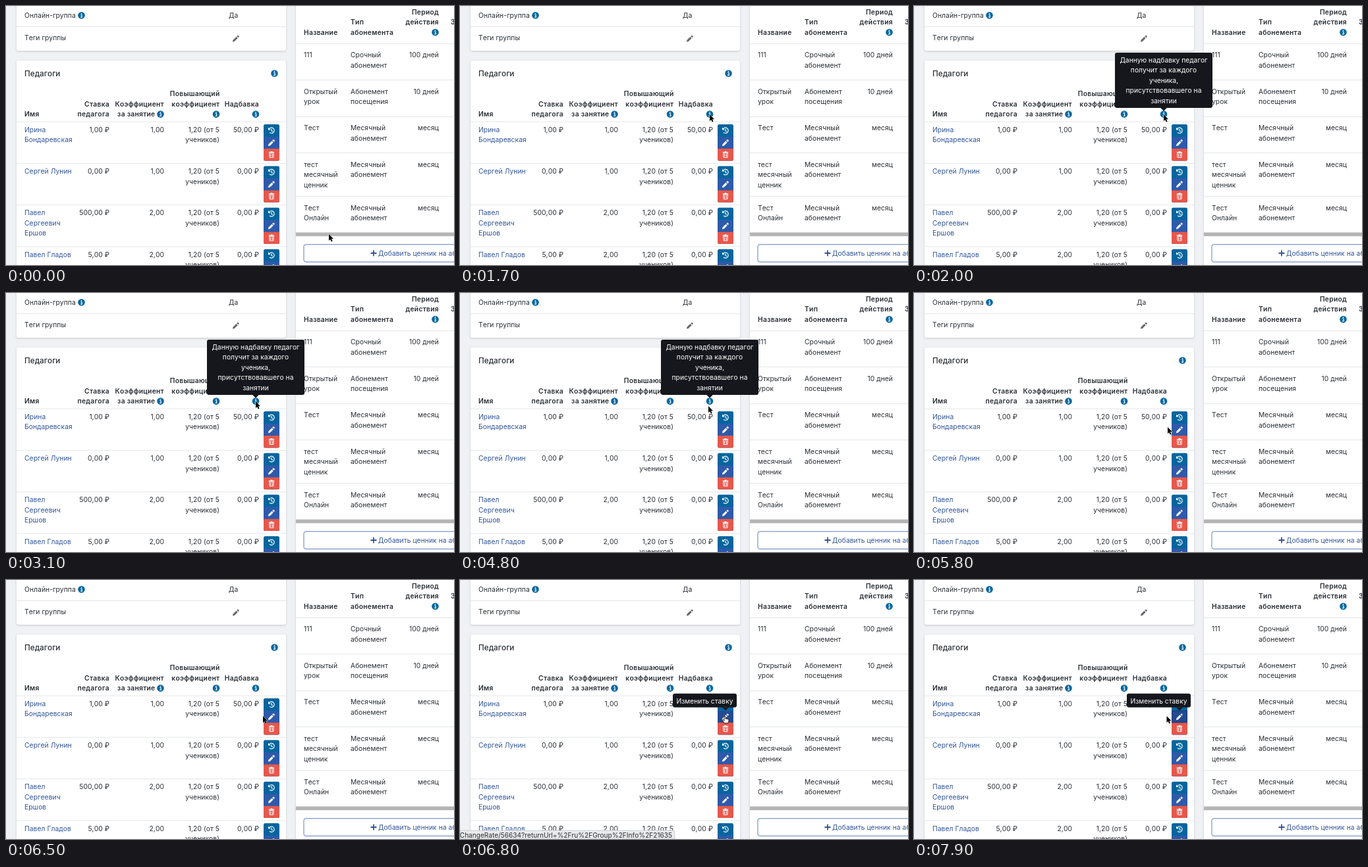
Recreate the animation shown at these times as an HTML page. Size 680 px wide and 394 px high, loop 8 s.

```html
<!DOCTYPE html>
<html lang="ru">
<head>
<meta charset="utf-8">
<style>
  html, body { margin: 0; width: 100%; height: 100%; overflow: hidden; background: #f0f1f4; }
  svg { display: block; width: 680px; height: 394px; }
  text { font: 10.3px Inter, sans-serif; font-kerning: none; letter-spacing: .06px; fill: #292d33; }
  .head { font-weight: 600; letter-spacing: .28px; }
  .title { font-size: 11.7px; font-weight: 500; }
  .link { fill: #315599; }
  .tip text { fill: #fff; letter-spacing: 0; }
  .tip { fill: #15171d; }
  .card { fill: #fff; filter: drop-shadow(0 1px 1.5px rgba(30, 35, 50, .2)); }
  .rule { stroke: #e4e6ea; }
  #status text { font-size: 10.1px; letter-spacing: 0; }
</style>
</head>
<body>
<svg id="stage" viewBox="0 0 680 394">
  <defs>
    <g id="info">
      <circle r="5.3" fill="#0667a0"/>
      <path d="M-1.3-.8H.6V2.5M-1.5 2.6H1.6" fill="none" stroke="#fff" stroke-width="1.1"/>
      <circle cy="-2.8" r=".85" fill="#fff"/>
    </g>
    <path id="pencil" d="M-5 5l.5-2.7 5-5 2.2 2.2-5 5zM1.2-3.4l1.2-1.2q.6-.6 1.2 0l1 1q.6.6 0 1.2L3.4-1.2z"/>
    <g id="history" fill="none" stroke="#fff" stroke-width="1.2">
      <path d="M-3.5-2.4A4.2 4.2 0 1 1-2.9 3.1M0-2.4V.3L1.8 1.6"/>
      <path d="M-5-4.6V-.9H-1.3z" fill="#fff" stroke="none"/>
    </g>
    <g id="trash" fill="none" stroke="#fff">
      <path d="M-4.3-3.6H4.3M-1.5-4.6H1.5" stroke-width="1.2"/>
      <path d="M-3.3-2.2H3.3L2.9 4.4H-2.9zM-1.3-1V3.2M1.3-1V3.2"/>
    </g>
  </defs>
  <g id="page"></g>
  <g id="hover">
    <rect id="hot" x="391.5" y="199.2" width="23" height="17.6" fill="#244a8f"/>
    <use href="#pencil" x="403" y="208" fill="#fff"/>
  </g>
  <g id="bonusTip" class="tip"></g>
  <g id="rateTip" class="tip"></g>
  <g id="status">
    <path d="M0 381H323.5q2.5 0 2.5 2.5V394H0z" fill="#e9eaec" stroke="#c3c6cb" stroke-width=".8"/>
    <text x="322" y="391.7" text-anchor="end">ChangeRate/56634?returnUrl=%2Fru%2FGroup%2FInfo%2F21635</text>
  </g>
  <path id="arrow" d="M0 0V9.9L2.2 7.9 3.8 11.4 5.6 10.7 4 7.2H7.1z" fill="#000" stroke="#fff" stroke-width=".9" paint-order="stroke"/>
  <path id="hand" d="M-1 .8Q0-.6 1 .8V4.2Q2.2 3.2 3 4.4 4.1 3.7 4.7 4.9 6 4.6 6 6V8L4.8 10.8H-.7L-3.5 6.8Q-3.7 5.3-2.2 5.8L-1 6.9z" fill="#fff" stroke="#111" stroke-width=".9"/>
</svg>
<script>
const $ = id => document.getElementById(id);
const LINE = 15.5;

const rect = (x, y, w, h, attrs = '') => `<rect x="${x}" y="${y}" width="${w}" height="${h}" ${attrs}/>`;
const rule = (x1, x2, y) => `<path class="rule" d="M${x1} ${y}H${x2}"/>`;
const icon = (name, x, y, fill = '#fff') => `<use href="#${name}" x="${x}" y="${y}" fill="${fill}"/>`;
// Lines are separated by "|"
const text = (str, x, y, cls = '', anchor = 'start') => str.split('|').map((s, i) =>
  `<text x="${x}" y="${y + i * LINE}" class="${cls}" text-anchor="${anchor}">${s}</text>`).join('');
const right = (str, x, y, cls) => text(str, x, y, cls, 'end');

function leftCards() {
  let out = rect(16, -10, 409, 78, 'rx="3" class="card"') + rect(16, 83, 409, 330, 'rx="3" class="card"')
    + text('Онлайн-группа', 28, 18) + text('Да', 338, 18) + rule(16, 425, 31.5)
    + text('Теги группы', 28, 52.3) + icon('pencil', 349, 49.5, '#666a70')
    + text('Педагоги', 28, 106.5, 'title')
    + text('Имя', 28, 168.2, 'head')
    + right('Ставка|педагога', 157, 152.7, 'head')
    + right('Коэффициент', 240, 152.7, 'head') + right('за занятие', 226.5, 168.2, 'head')
    + right('Повышающий|коэффициент', 324.5, 137.2, 'head')
    + right('Надбавка', 384, 152.7, 'head');
  for (const [x, y] of [[114.5, 14.3], [407.5, 102.5], [234.5, 164.6], [319, 164.6], [379, 164.6]])
    out += icon('info', x, y);

  const teachers = [
    ['Ирина|Бондаревская', '1,00', '1,00', '50,00'],
    ['Сергей Лунин', '0,00', '1,00', '0,00'],
    ['Павел|Сергеевич|Ершов', '500,00', '2,00', '0,00'],
    ['Павел Гладов', '5,00', '2,00', '0,00'],
  ];
  teachers.forEach(([name, rate, factor, bonus], i) => {
    const y = 191.8 + i * 63.3, top = y - 11.7;
    out += rule(16, 425, y - 15.7)
      + text(name, 28, y, 'link') + right(rate + ' ₽', 157, y) + right(factor, 240, y)
      + right('1,20 (от 5|учеников)', 324, y) + right(bonus + ' ₽', 384, y)
      + rect(391, top, 24, 55.3, 'rx="2.5" fill="#04659e"')
      + rect(391, top + 18.7, 24, 18.5, 'fill="#2e5aaa"')
      + `<path d="M391 ${top + 37}h24v15.8q0 2.5-2.5 2.5h-19q-2.5 0-2.5-2.5z" fill="#e7574c"/>`
      + icon('history', 403, top + 9.2) + icon('pencil', 403, top + 27.8) + icon('trash', 403, top + 46);
  });
  return out;
}

function rightCard() {
  let out = rect(440, -10, 260, 420, 'class="card"')
    + text('Название', 452, 43.5, 'head') + text('Тип|абонемента', 523, 28, 'head')
    + right('Период|действия', 657, 12.5, 'head') + text('З', 675, 28, 'head')
    + icon('info', 651.5, 40);
  const plans = [
    [78, '111', 'Срочный|абонемент', '100 дней'],
    [133.6, 'Открытый|урок', 'Абонемент|посещения', '10 дней'],
    [189, 'Тест', 'Месячный|абонемент', 'месяц'],
    [244.7, 'тест|месячный|ценник', 'Месячный|абонемент', 'месяц'],
    [310.5, 'Тест|Онлайн', 'Месячный|абонемент', 'месяц'],
  ];
  for (const [y, name, type, period] of plans)
    out += rule(440, 680, Math.round(y - 21.5) + .5) + text(name, 452, y) + text(type, 523, y) + right(period, 657, y);
  return out + rect(440, 344.5, 240, 5.7, 'fill="#b5b5b6"')
    + rect(452, 362.8, 260, 26.6, 'rx="3" fill="#fff" stroke="#4c70b3" stroke-width=".9"')
    + '<path d="M553.5 376H562.5M558 371.5V380.5" stroke="#315599" stroke-width="1.8"/>'
    + text('Добавить ценник на абонемент', 565, 379.8, 'link');
}

const tip = (x, y, w, h, ax, str) => rect(x, y, w, h, 'rx="3"')
  + `<path d="M${ax - 5} ${y + h - .3}h10l-5 5z"/>` + text(str, x + w / 2, y + 14.8, '', 'middle');

$('page').innerHTML = leftCards() + rightCard();
$('bonusTip').innerHTML = tip(305, 71, 148, 84, 379,
  'Данную надбавку педагог|получит за каждого|ученика,|присутствовавшего на|занятии');
$('rateTip').innerHTML = tip(323, 172.8, 97, 21, 403, 'Изменить ставку');

// [time, x, y] of the pointer tip
const path = [
  [0, 490, 347], [200, 481, 325], [500, 437, 235], [800, 409, 180], [900, 405, 172],
  [1200, 380, 165], [1400, 378, 163], [1500, 378, 163], [1700, 379, 165], [4700, 379, 165],
  [4800, 377, 172], [5600, 377, 185], [5800, 385, 204], [6500, 390, 207], [6600, 402, 207],
  [7400, 402, 207], [7600, 392, 207], [7900, 383.5, 207],
];

function pointer(t) {
  const i = path.findIndex(p => p[0] > t);
  if (i < 0) return path[path.length - 1].slice(1);
  const [t0, x0, y0] = path[i - 1], [t1, x1, y1] = path[i], k = (t - t0) / (t1 - t0);
  return [x0 + (x1 - x0) * k, y0 + (y1 - y0) * k];
}

const ramp = (t, a, b) => Math.min(1, Math.max(0, (t - a) / (b - a)));
const fade = (id, t, a, b, c, d) => $(id).setAttribute('opacity', ramp(t, a, b) - ramp(t, c, d));
const show = (id, on) => $(id).setAttribute('visibility', on ? 'visible' : 'hidden');

function draw(t) {
  const at = `translate(${pointer(t)})`, hand = t >= 6600 && t < 7700;
  $('arrow').setAttribute('transform', at);
  $('hand').setAttribute('transform', at);
  show('arrow', !hand);
  show('hand', hand);
  show('hover', t >= 6600);
  $('hot').setAttribute('stroke', t >= 7100 ? '#1b386f' : 'none');
  fade('bonusTip', t, 1800, 2000, 4800, 5000);
  fade('rateTip', t, 6500, 6700, 8000, 8100);
  fade('status', t, 6600, 6800, 7700, 7900);
}

function tick(now) {
  draw(Math.floor(now % 8000 / 100) * 100);
  requestAnimationFrame(tick);
}
draw(0);
requestAnimationFrame(tick);
</script>
</body>
</html>
```
